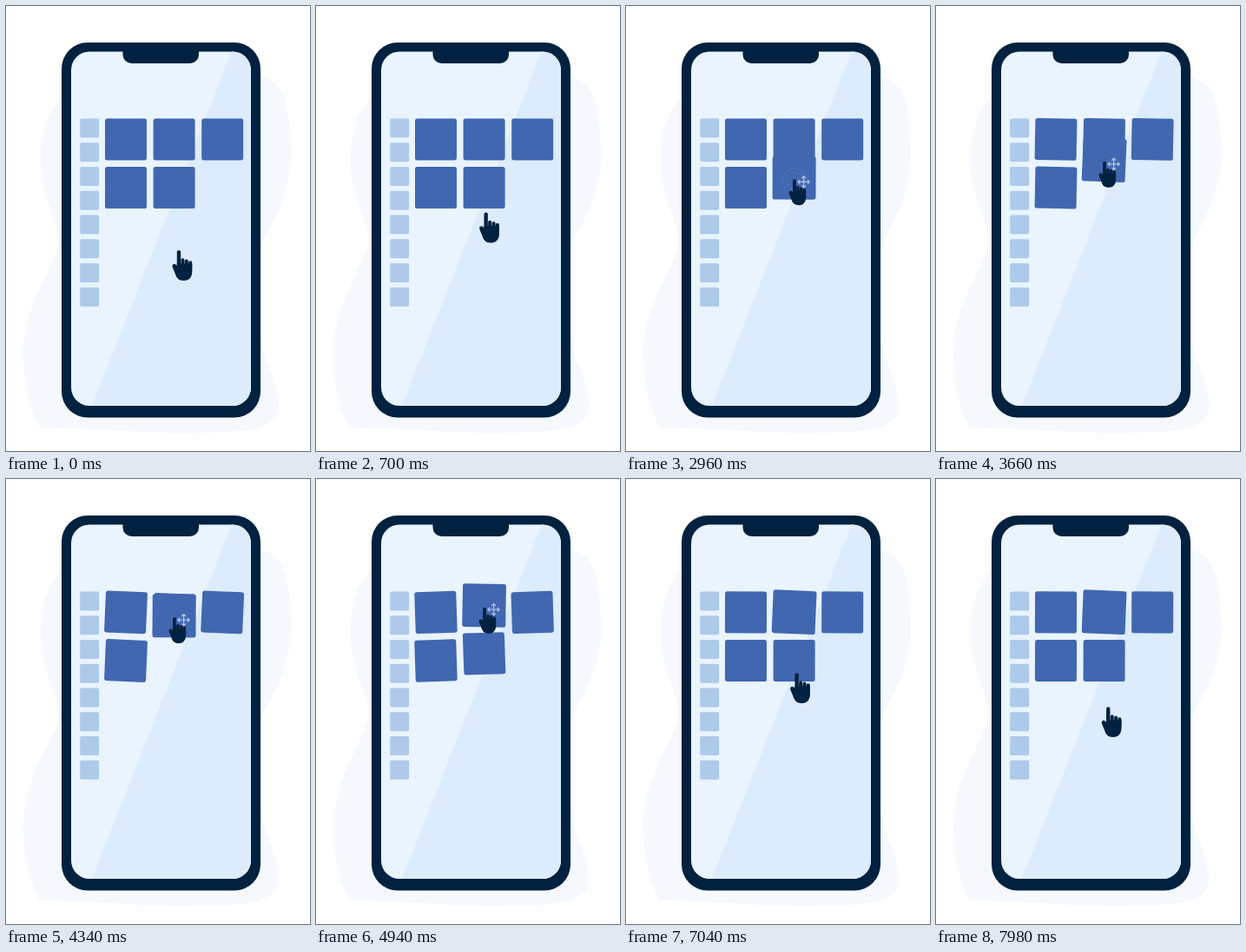
An HTML page for the animation above (8000 ms loop, 350 by 512 pixels).

```html
<!DOCTYPE html>
<html lang="en">
<head>
<meta charset="utf-8">
<title>Rearranging tiles</title>
<style>
html, body { margin: 0; width: 100%; height: 100%; overflow: hidden; background: #fff; }
svg { display: block; width: 100vw; height: 100vh; }
</style>
</head>
<body>
<svg viewBox="0 0 350 512">
  <defs>
    <clipPath id="screen"><rect x="75" y="52.500" width="207" height="407.500" rx="21"/></clipPath>
  </defs>
  <path fill="#f5f9fd" d="M64 105C46 124 39 150 40 182C41 220 57 240 61 268C62 294 18 340 20 405C21 440 28 465 39 485C90 484 140 491 205 491C255 491 314 492 314 462C314 428 293 405 293 372V277C301 258 328 222 328 171C328 112 318 84 293 82Z"/>
  <rect x="64" y="42" width="229" height="431.500" rx="30" fill="#00213f"/>
  <g clip-path="url(#screen)">
    <rect x="75" y="52" width="207" height="409" fill="#e9f4ff"/>
    <path d="M260 52H283V461H98.500Z" fill="#dcecfd"/>
  </g>
  <path d="M134.500 50H222V56A10 10 0 0 1 212 66H144.500A10 10 0 0 1 134.500 56Z" fill="#00213f"/>
  <g id="side" fill="#aecaea"></g>
  <g id="tiles" fill="#4167b1"></g>
  <g id="ripple" fill="none" stroke="#7f9dd3" stroke-width=".8"><circle/><circle/></g>
  <g id="move" fill="none" stroke="#fff" stroke-width="1.300" stroke-linecap="round" stroke-linejoin="round">
    <path d="M-6.500 0H6.500M0-6.500V6.500M-2-4.700L0-6.700L2-4.700M-2 4.700L0 6.700L2 4.700M-4.700-2L-6.700 0L-4.700 2M4.700-2L6.700 0L4.700 2"/>
  </g>
  <g id="hand" fill="#00213f" stroke="#00213f" stroke-linecap="round">
    <path stroke="none" d="M-6.200-2H11.300V7C11.300 13.500 7.500 17.500 2 17.500C-4.500 17.500-6.800 14-8.200 9.500L-11.300 2C-12.200-1-9.500-2.800-7.500-1L-6.200.5Z"/>
    <path fill="none" stroke-width="4.400" d="M-4-15.200V4"/>
    <path fill="none" stroke-width="4" d="M.5-6.200V4M4.900-5V4M9.200-3.200V4"/>
  </g>
</svg>
<script>
const LOOP = 8000, SIZE = 48, STEP = 55.6;
const $ = id => document.getElementById(id);

function addRect(parent, x, y, size, r) {
  const el = document.createElementNS('http://www.w3.org/2000/svg', 'rect');
  const attrs = { x, y, width: size, height: size, rx: r };
  for (const k in attrs) el.setAttribute(k, attrs[k]);
  return parent.appendChild(el);
}

for (let i = 0; i < 8; i++) addRect($('side'), 85.2, 129.6 + i * 27.75, 22, 1.8);

const tiles = [0, 1, 2, 3, 4].map(i => ({
  x: 138 + (i % 3) * STEP,
  y: 153.4 + Math.floor(i / 3) * STEP,
  el: addRect($('tiles'), -SIZE / 2, -SIZE / 2, SIZE, 2.6)
}));

const clamp = u => Math.min(1, Math.max(0, u));
const ramp = (t, a, b) => { const u = clamp((t - a) / (b - a)); return u * u * (3 - 2 * u); };

// Smooth curve through [time, value] points, flat at turning points and ends
function curve(keys) {
  const slope = i => {
    const a = keys[i - 1], b = keys[i], c = keys[i + 1];
    if (!a || !c || (b[1] - a[1]) * (c[1] - b[1]) <= 0) return 0;
    return (c[1] - a[1]) / (c[0] - a[0]);
  };
  return t => {
    if (t <= keys[0][0]) return keys[0][1];
    const i = keys.findIndex(k => k[0] > t) - 1;
    if (i < 0) return keys[keys.length - 1][1];
    const [t0, v0] = keys[i], [t1, v1] = keys[i + 1];
    const d = t1 - t0, u = (t - t0) / d, w = 1 - u;
    return v0 * w * w * (1 + 2 * u) + v1 * u * u * (3 - 2 * u)
      + d * u * w * (w * slope(i) - u * slope(i + 1));
  };
}

const PEAK = 4740;
const drag = curve([[2400, 0], [2960, -11.3], [3260, -20.2], [4340, -51.5], [PEAK, -64]]);
const leave = curve([[PEAK, 161.5], [5700, 183], [7040, 240.5], [7360, 254.5], [7980, 279.5], [9024, 298.5]]);
const wobble = (t, peak, period) => 2.5 * Math.cos(2 * Math.PI * (t - peak) / period);

function place(el, x, y, angle = 0, scale = 1) {
  el.setAttribute('transform',
    `translate(${x.toFixed(3)} ${y.toFixed(3)}) rotate(${angle.toFixed(3)}) scale(${scale.toFixed(4)})`);
}

function handAt(t) {
  if (t < 1700) {
    const p = ramp(t, 0, 1240);
    return [203 - 5.6 * p, 298.5 - 73 * p];
  }
  if (t < PEAK) return [197.4, 225.5 + drag(t)];
  const y = leave(t);
  return [197.4 + 5.6 * (y - 161.5) / 137, y];
}

function draw(t) {
  const sway = wobble(t, 4340, 373) * ramp(t, 3260, 3500);
  const swap = ramp(t, 4220, 5170);
  const lift = drag(t) + 8.2 * ramp(t, 4860, 5400);

  tiles.forEach((tile, i) => {
    if (i === 4) {
      const own = wobble(t, 7040, 308) * ramp(t, 2460, 3000);
      place(tile.el, tile.x, tile.y + lift, own, 1 + 0.04 * ramp(t, 2440, 2700));
    } else {
      place(tile.el, tile.x, tile.y + (i === 1 ? STEP * swap : 0), sway);
    }
  });

  const held = tiles[4];
  place($('move'), held.x + 11, held.y + lift + 4.7);
  $('move').setAttribute('opacity', 0.6 * ramp(t, 2480, 2720) * (1 - ramp(t, 4900, 5200)));

  const pulse = clamp((t - 2460) / 800);
  const rings = $('ripple');
  place(rings, 194, 212.5 + drag(t));
  rings.setAttribute('opacity', pulse > 0 ? 0.7 * (1 - pulse) : 0);
  rings.children[0].setAttribute('r', 4 + 16 * pulse);
  rings.children[1].setAttribute('r', 1 + 14 * pulse);

  const [x, y] = handAt(t);
  const swell = ramp(t, 1740, 2080) * (1 - ramp(t, 2080, 2420));
  const press = ramp(t, 2360, 2640) * (1 - ramp(t, 4980, 5300));
  place($('hand'), x + swell, y - 1.5 * swell, 0, 1 + 0.06 * swell - 0.14 * press);
}

const start = performance.now();
function tick(now) {
  draw(Math.max(0, now - start) % LOOP);
  requestAnimationFrame(tick);
}
draw(0);
requestAnimationFrame(tick);
</script>
</body>
</html>
```
